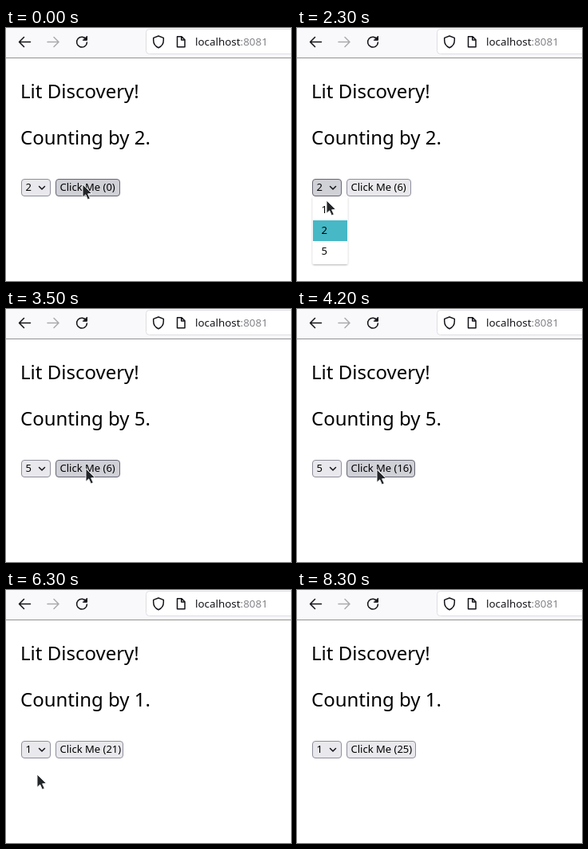
Animation of 357x317 px, one loop 9.3 s. Source, as an HTML page:

```html
<!DOCTYPE html>
<html lang="en">
<head>
<meta charset="utf-8">
<title>Counter demo</title>
<style>
  html, body { margin: 0; width: 100%; height: 100%; overflow: hidden; background: #fff; }
  svg { display: block; }
  text { font: 13px "Noto Sans", "Open Sans", sans-serif; white-space: pre; }
  .big { font-size: 24px; }
  .url { font-size: 13.4px; fill: #15141a; }
  .icon { fill: none; stroke: #15141a; stroke-width: 1.5; stroke-linecap: round; stroke-linejoin: round; }
</style>
</head>
<body>
<svg width="357" height="317" viewBox="0 0 357 317">
  <defs>
    <filter id="soft" x="-20%" y="-20%" width="140%" height="140%">
      <feDropShadow dx="0" dy="1" stdDeviation="1" flood-opacity=".3"/>
    </filter>
  </defs>

  <!-- browser toolbar -->
  <rect width="357" height="37" fill="#f9f9fb"/>
  <rect y="37" width="357" height="1" fill="#939396"/>
  <rect x="175.5" y="1.5" width="200" height="31" rx="4" fill="#fff" stroke="#dedee3"/>
  <g class="icon">
    <path d="M30.5 17.5H17M22.5 11.5l-6 6 6 6"/>
    <path d="M52 17.5h13.5M60 11.5l6 6-6 6" stroke="#ababae"/>
    <path d="M100.6 14.5A6.4 6.4 0 1 0 101.4 18"/>
    <path d="M101.5 10.5v4.8h-4.8z" fill="#15141a" stroke-width="1"/>
    <path d="M191 10l6.3 2.4v3.2c0 4.2-2.4 7.5-6.3 9.2-3.900-1.700-6.300-5-6.300-9.200v-3.200z"/>
    <path d="M214.500 10.700h5.500l4 4v9h-9.500zM219.700 11v4h4"/>
  </g>
  <text class="url" x="237" y="22">localhost<tspan fill="#85858b">:8081</tspan></text>

  <!-- page -->
  <text class="big" x="18" y="88">Lit Discovery!</text>
  <text class="big" x="18" y="146" id="title"></text>

  <rect id="select" x="19.500" y="189.500" width="36" height="21" rx="3.500"/>
  <text id="value" x="24.500" y="204"></text>
  <path class="icon" d="M41.500 198.500l3.500 3.500 3.500-3.500" stroke-width="1.700"/>
  <rect id="button" x="62.500" y="189.500" height="21" rx="3.500"/>
  <text id="label" x="67.500" y="204"></text>

  <g id="popup">
    <rect x="19.500" y="211" width="44" height="85" rx="2" fill="#fff" filter="url(#soft)"/>
    <rect id="mark" x="20" width="43" height="26" fill="#46b8c6"/>
    <text x="30.500" y="232">1</text>
    <text x="30.500" y="258">2</text>
    <text x="30.500" y="284">5</text>
  </g>

  <path id="arrow" d="M0 0v16.300l3.700-3.400 2.700 6 2.900-1.300-2.700-5.800 5-.4z"
        fill="#232629" stroke="#fff" stroke-width=".9" stroke-linejoin="round"/>
  <g id="beam" fill="none">
    <path d="M-2.500-6.500h5M0-6.500v13M-2.500 6.500h5" stroke="#fff" stroke-width="3"/>
    <path d="M-2.500-6.500h5M0-6.500v13M-2.500 6.500h5" stroke="#232629" stroke-width="1.200"/>
  </g>
</svg>
<script>
const LOOP = 9300, STEP = 100, GONE = 8300;
const OPTIONS = [1, 2, 5];
const $ = id => document.getElementById(id);

// Fill and border: normal, hovered, pressed
const SKIN = [['#e9e9ed', '#8f8f9d'], ['#d0d0d7', '#676774'], ['#b1b1b9', '#484851']];

// Pointer waypoints: time, x, y
const path = [
  [0, 96, 196], [100, 94.5, 196], [1400, 94.5, 196], [1700, 38, 203],
  [2200, 38, 203], [2300, 37, 216], [2900, 38, 277], [3000, 38, 277],
  [3500, 100, 200], [3600, 100, 200], [3700, 100, 201], [4900, 100, 201],
  [5200, 53, 202], [5400, 41, 201], [5700, 41, 201], [5900, 39, 231],
  [6300, 39, 231], [6600, 96, 194], [7700, 96, 194], [8200, 41, 3]
];

// Hard changes: time -> value
const count = { 0: 0, 600: 2, 1000: 4, 1500: 6, 3800: 11, 4200: 16, 4900: 21,
                6800: 22, 7000: 23, 7200: 24, 7600: 25 };
const amount = { 0: 2, 3100: 5, 6300: 1 };
const marked = { 0: 0, 2100: 2, 2400: 1, 2600: 2, 2800: 5, 3100: 0, 5700: 5, 5900: 1, 6300: 0 };
const selectState = { 0: 0, 1700: 1, 2000: 2, 2100: 1, 3100: 0, 5400: 1, 5600: 2, 5700: 1, 6300: 0 };
const buttonState = { 0: 1, 1600: 0, 3500: 1, 5300: 0, 6600: 1, 8000: 0 };
for (const press of [500, 1400, 3700, 4100, 4800, 6700, 6900, 7100]) {
  buttonState[press] = 2;
  buttonState[press + STEP] = 1;
}

// Integer keys are kept in ascending order
const at = (track, t) => track[Object.keys(track).filter(k => k <= t).pop()];

function pointer(t) {
  const i = path.findIndex(p => p[0] > t);
  if (i < 0) return path[path.length - 1].slice(1);
  const [t0, x0, y0] = path[i - 1], [t1, x1, y1] = path[i];
  const k = (t - t0) / (t1 - t0);
  return [x0 + (x1 - x0) * k, y0 + (y1 - y0) * k];
}

function buttonWidth(n) {
  if (n < 10) return 80;
  return 86 - (n % 10 === 1 ? 2 : n < 20 ? 1 : 0);
}

function paint(id, state) {
  const [fill, stroke] = SKIN[state];
  $(id).setAttribute('fill', fill);
  $(id).setAttribute('stroke', stroke);
}

const show = (id, on) => $(id).setAttribute('visibility', on ? 'visible' : 'hidden');

function draw(now) {
  const t = Math.floor(now % LOOP / STEP) * STEP;
  const n = at(count, t), by = at(amount, t), mark = at(marked, t);

  $('title').textContent = `Counting by ${by}.`;
  $('value').textContent = by;
  $('label').textContent = `Click Me (${n})`;
  $('button').setAttribute('width', buttonWidth(n));
  paint('select', at(selectState, t));
  paint('button', at(buttonState, t));

  show('popup', mark);
  $('mark').setAttribute('y', 215 + 26 * OPTIONS.indexOf(mark));

  const beam = t === 5200;
  show('beam', beam);
  show('arrow', !beam && t < GONE);
  $(beam ? 'beam' : 'arrow').setAttribute('transform', `translate(${pointer(t)})`);
}

function frame() {
  draw(performance.now());
  requestAnimationFrame(frame);
}
frame();
</script>
</body>
</html>
```
